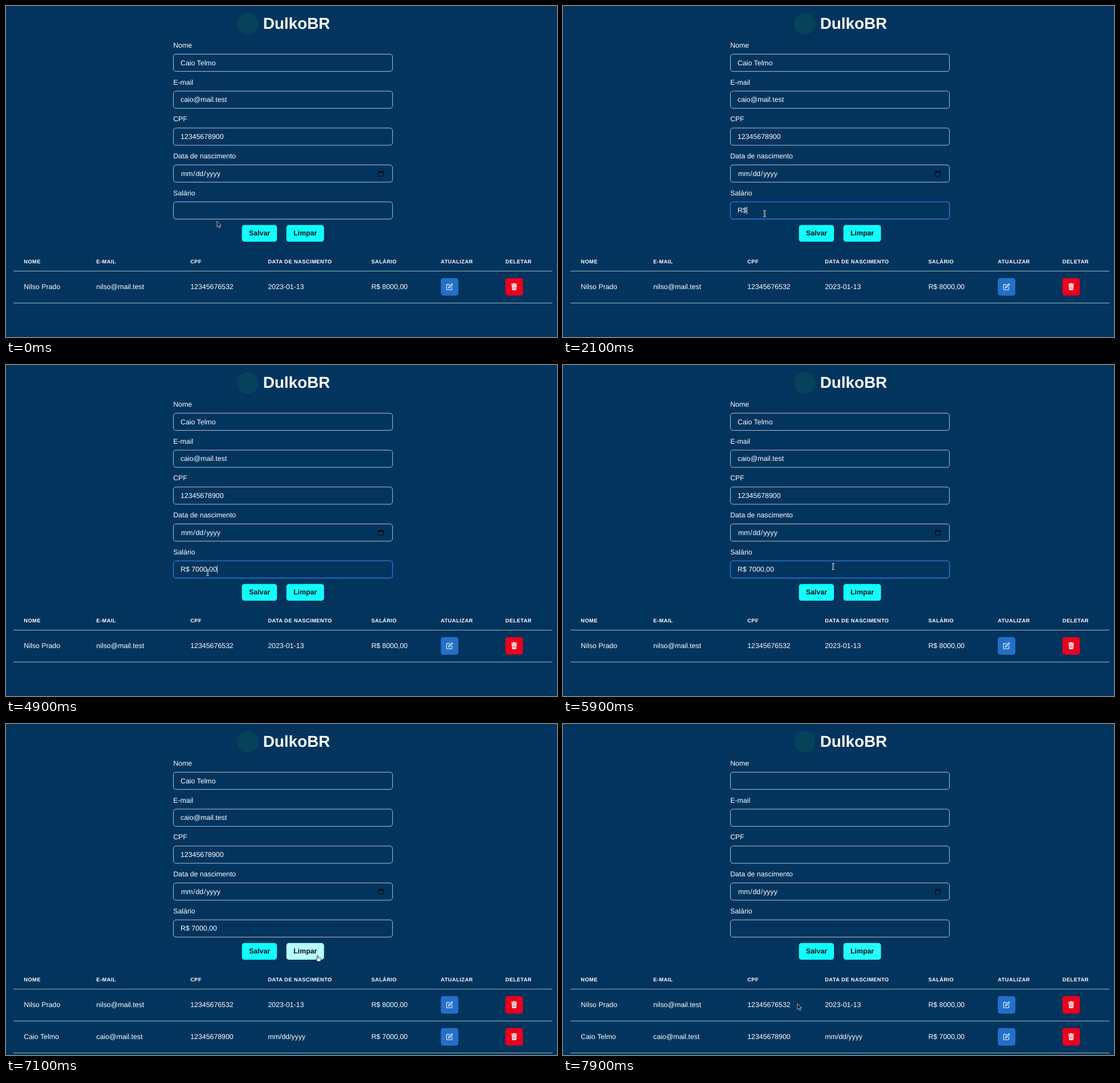
Write an HTML page that moves like this. It is 966 px wide and 580 px high and loops after 8000 ms.

```html
<!DOCTYPE html>
<html lang="pt-BR">
<head>
<meta charset="utf-8">
<title>Cadastro</title>
<style>
  html, body { margin: 0; width: 100%; height: 100%; overflow: hidden; background: #02345e; }
  svg { display: block; }
  text {
    font: 12.35px "Liberation Sans", Arial, sans-serif;
    fill: #fff; white-space: pre; text-rendering: geometricPrecision;
  }
  .title { font-size: 27.8px; font-weight: bold; }
  .head { font-size: 9.26px; font-weight: bold; letter-spacing: .05em; }
  .button { font-weight: bold; fill: #04101c; }
  .field { fill: none; stroke: #e2e8f0; stroke-width: .8; }
  .field.hover { stroke: #cbd5e0; }
  .field.focus { stroke: #2a70c8; stroke-width: 1.6; }
  .rule { fill: #b2dfdf; }
  .icon { fill: none; stroke: #fff; stroke-width: 2; stroke-linecap: round; stroke-linejoin: round; }
</style>
</head>
<body>
<svg id="stage" width="966" height="580" viewBox="0 0 966 580"></svg>
<script>
const LOOP = 8000, STEP = 100;
const stage = document.getElementById('stage');
const find = id => document.getElementById(id);

const person = { name: 'Caio Telmo', mail: 'caio@mail.test', cpf: '12345678900' };
const labels = ['Nome', 'E-mail', 'CPF', 'Data de nascimento', 'Salário'];
const columns = [31.3, 158.3, 323.2, 459.2, 640.4, 762.3, 875.5];
const headings = ['NOME', 'E-MAIL', 'CPF', 'DATA DE NASCIMENTO', 'SALÁRIO', 'ATUALIZAR', 'DELETAR'];
const salary = 'R$ 7000,00';
const DATE = 3, SALARY = 4;
const buttons = {
  save: { label: 'Salvar', x: 413.6, width: 61.4, enter: 5900, press: 6200, leave: 6600 },
  clear: { label: 'Limpar', x: 491.6, width: 65.9, enter: 6900, press: 7200, leave: 7720 }
};

const text = (x, y, content, cls = '', id = '') =>
  `<text x="${x}" y="${y}" class="${cls}" id="${id}">${content}</text>`;
const fieldTop = i => 84.4 + 64.7 * i;
const rule = y => `<rect class="rule" x="13" y="${y + .1}" width="945" height=".8"/>`;

function field(label, i) {
  const y = fieldTop(i), gap = part => `<tspan dx=".77">${part}</tspan>`;
  const value = i === DATE
    ? text(306.9, y + 19.1, 'mm' + ['/', 'dd', '/', 'yyyy'].map(gap).join(''))
    : text(306, y + 19.1, '', '', 'value' + i);
  return text(293.2, y - 11.4, label) + value +
    `<rect class="field" id="field${i}" x="293.5" y="${y}" width="384.1" height="30.2" rx="4.6"/>`;
}

const actionBox = (x, y, color) =>
  `<rect x="${x}" y="${y + 12.7}" width="30.8" height="30.8" rx="4.6" fill="${color}"/>`;

function row(cells, y) {
  return cells.map((cell, i) => text(columns[i], y + 32, cell)).join('') +
    actionBox(columns[5], y, '#2470c8') +
    `<g class="icon" transform="translate(771.3 ${y + 21.8}) scale(.525)">
       <path d="M11 4H4a2 2 0 0 0-2 2v14a2 2 0 0 0 2 2h14a2 2 0 0 0 2-2v-7"/>
       <path d="M18.5 2.5a2.1 2.1 0 0 1 3 3L12 15l-4 1 1-4z"/>
     </g>` +
    actionBox(columns[6], y, '#e9001d') +
    `<g transform="translate(885.6 ${y + 21.7})">
       <path fill="#fff" d="M.2 1h3l.5-.9h3.2l.5.9h3v1.6H.2zM1 3.4h8.6L9 11.4q-.1 1-1.1 1H2.7q-1 0-1.1-1z"/>
       <path stroke="#e9001d" stroke-width=".7" d="M3.2 5v5.8M5.3 5v5.8M7.4 5v5.8"/>
     </g>` + rule(y + 56);
}

const button = ([id, { x, width, label }]) =>
  `<rect id="${id}" x="${x}" y="383.7" width="${width}" height="29.3" rx="4.4"/>` +
  text(x + 12.4, 402.2, label, 'button');

const beam = 'M-2-5.2Q0-5.2 0-4V4Q0 5.2-2 5.2M2-5.2Q0-5.2 0-4M0 4Q0 5.2 2 5.2';

stage.innerHTML =
  '<circle cx="423.8" cy="31.2" r="19" fill="#06425a"/>' +
  text(450.8, 40.4, 'DulkoBR', 'title') +
  labels.map(field).join('') +
  `<rect x="652.6" y="290" width="9" height="8.5" rx=".8" fill="none" stroke="#05080c"/>
   <path d="M652.5 290h9.2v2h-9.2zM653.8 288.6h1.1v2h-1.1zM659.2 288.6h1.1v2h-1.1z" fill="#05080c"/>` +
  Object.entries(buttons).map(button).join('') +
  headings.map((h, i) => text(columns[i], 451.3, h, 'head')).join('') + rule(464) +
  row(['Nilso Prado', 'nilso@mail.test', '12345676532', '2023-01-13', 'R$ 8000,00'], 464) +
  `<g id="newRow">${row([person.name, person.mail, person.cpf, 'mm/dd/yyyy', salary], 520)}</g>
   <rect id="caret" y="351.3" width=".9" height="13.5" fill="#fff"/>
   <g id="mouse">
     <path id="arrow" d="M0 0V10.3L2.4 8.2 4 11.9 5.7 11.2 4.1 7.6H7.2Z" fill="#0b1119" stroke="#e8dfdc" stroke-width=".8"/>
     <g id="beam" fill="none">
       <path d="${beam}M-1 .9H1" stroke="#f2f2f2" stroke-width="2"/>
       <path d="${beam}" stroke="#17212c" stroke-width=".7"/>
     </g>
     <path id="hand" d="M-.9.8Q0-.4.9.8V4.2L5 5Q6 5.3 5.8 6.5L5 10.8H-.6L-3.2 7.2Q-3.4 5.8-2 6L-.9 7Z"
       fill="#fff" stroke="#111" stroke-width=".8"/>
   </g>`;

const home = { x: 370, y: 377 };
const moves = [
  { from: 100, to: 200, x: 370, y: 376 },
  { from: 300, to: 700, x: 371, y: 226 },
  { from: 700, to: 1100, x: 353.5, y: 363.8 },
  { from: 5500, to: 5750, x: 430, y: 300 },
  { from: 5750, to: 5900, x: 473.5, y: 353 },
  { from: 5900, to: 6100, x: 458, y: 392 },
  { from: 6600, to: 6800, x: 502, y: 196 },
  { from: 6800, to: 7100, x: 546.5, y: 405.3 },
  { from: 7600, to: 7900, x: 411, y: 490 }
];
const keyTimes = [1600, 2100, 2900, 3300, 3300, 3600, 3600, 4500, 4800, 4900];
const caretToggles = [1000, 1400, 1600, 3100, 3300, 4200, 4500, 5600];
const FOCUS = 1000, BLUR = buttons.save.press + 100;
const ADDED = BLUR + 100, CLEARED = buttons.clear.press + 100;

const ramp = (t, from, to) => Math.min(1, Math.max(0, (t - from) / (to - from)));
const passed = (times, t) => times.filter(time => time <= t).length;
const show = (id, on) => find(id).setAttribute('visibility', on ? 'visible' : 'hidden');

function pointerAt(t) {
  return moves.reduce((p, m) => {
    const k = (1 - Math.cos(Math.PI * ramp(t, m.from, m.to))) / 2;
    return { x: p.x + (m.x - p.x) * k, y: p.y + (m.y - p.y) * k };
  }, home);
}

// Hover lightens the button, pressing lightens it further, leaving restores it
function buttonColor({ enter, press, leave }, t) {
  const white = (.7 * ramp(t, enter, enter + 200) + .17 * ramp(t, press, press + 200)) *
    (1 - ramp(t, leave, leave + 200));
  return `rgb(${[17, 253, 251].map(c => Math.round(c + (255 - c) * white))})`;
}

function hoveredField({ x, y }) {
  if (x < 293 || x > 678) return -1;
  return labels.findIndex((_, i) => y >= fieldTop(i) && y <= fieldTop(i) + 30.2);
}

function pointerKind({ x, y }, over, t) {
  if (over >= 0) return over === DATE ? 'arrow' : 'beam';
  const onButton = y > 383.7 && y < 413 && Object.values(buttons)
    .some(b => x > b.x && x < b.x + b.width && t < b.press + 300);
  return onButton ? 'hand' : 'arrow';
}

function render(t) {
  const pointer = pointerAt(t);
  const over = hoveredField(pointer);
  const kind = pointerKind(pointer, over, t);
  find('mouse').setAttribute('transform', `translate(${pointer.x} ${pointer.y})`);
  ['arrow', 'beam', 'hand'].forEach(k => show(k, k === kind));

  labels.forEach((_, i) => {
    const focused = i === SALARY && t >= FOCUS && t < BLUR;
    find('field' + i).setAttribute('class', 'field' + (focused ? ' focus' : i === over ? ' hover' : ''));
  });

  const filled = t < CLEARED;
  const typed = filled ? salary.slice(0, passed(keyTimes, t)) : '';
  const value = find('value' + SALARY);
  value.textContent = typed;
  Object.values(person).forEach((v, i) => find('value' + i).textContent = filled ? v : '');
  find('caret').setAttribute('x', 306 + (typed ? value.getComputedTextLength() : 0));
  show('caret', passed(caretToggles, t) % 2);

  Object.entries(buttons).forEach(([id, b]) => find(id).setAttribute('fill', buttonColor(b, t)));
  show('newRow', t >= ADDED);
}

const start = performance.now();
function tick(now) {
  const t = Math.max(0, now - start) % LOOP;
  render(Math.floor(t / STEP) * STEP);
  requestAnimationFrame(tick);
}
render(0);
requestAnimationFrame(tick);
</script>
</body>
</html>
```
